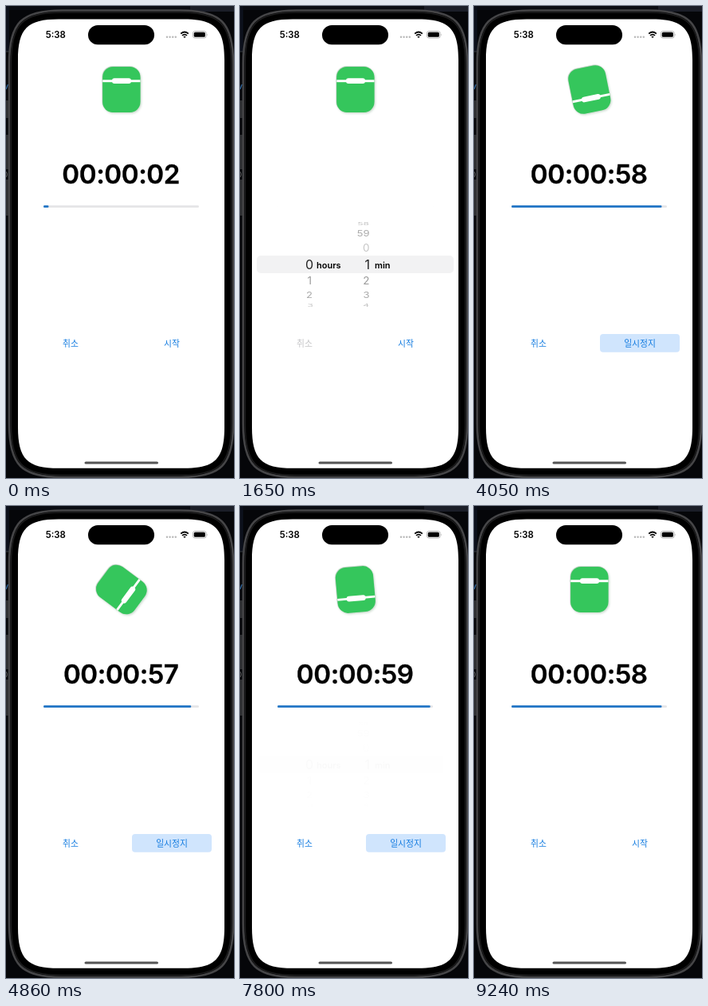
Write an HTML page that moves like this. It is 286x590 px and loops after 9.36 s.

```html
<!DOCTYPE html>
<html lang="ko">
<head>
<meta charset="utf-8">
<title>Timer</title>
<style>
  html, body { margin: 0; height: 100%; overflow: hidden; background: #000; }
  svg { display: block; width: 100%; height: 100%; }
  text { font-family: Inter, Roboto, sans-serif; }
  .ko { font-family: "Noto Sans CJK KR", "Noto Sans CJK", sans-serif; font-size: 10.8px; text-anchor: middle; fill: #147ce0; }
  .unit { font-size: 11px; font-weight: 600; }
  .row { text-anchor: end; }
  #clock { font-size: 33.2px; font-weight: 600; letter-spacing: -.45px; text-anchor: middle; stroke: #000; stroke-width: .3px; }
</style>
</head>
<body>
<svg viewBox="0 0 286 590">
  <defs>
    <filter id="relief" x="-30%" y="-30%" width="160%" height="160%">
      <feDropShadow dx="-.5" dy="-.6" stdDeviation=".3" flood-color="#4a7d58" flood-opacity=".5"/>
      <feDropShadow dx="1.2" dy="1.4" stdDeviation=".9" flood-color="#2a6a3c" flood-opacity=".25"/>
    </filter>
  </defs>

  <!-- desktop behind the phone -->
  <rect width="286" height="590" fill="#050609"/>
  <rect width="286" height="5" fill="#0a0c13"/>
  <rect x="231" width="55" height="7" fill="#1b1e28"/>
  <rect width="4" height="57" fill="#0c101b"/>
  <rect y="56.500" width="4" height="1" fill="#33363d"/>
  <path d="M0 104L2.500 98" stroke="#2f6fb0" stroke-width="1.200"/>
  <text x="-3.500" y="213.500" font-size="9" fill="#777">0</text>
  <g fill="#2d2e31">
    <rect x="-2" y="118" width="6" height="22" rx="1"/>
    <rect x="-2" y="161" width="6" height="43" rx="1"/>
    <rect x="-2" y="217" width="6" height="45" rx="1"/>
  </g>

  <!-- phone -->
  <path id="edge" stroke="#454547" stroke-width="2.600"/>
  <path id="bezel" fill="none" stroke="#1d1d1e" stroke-width="1.400"/>
  <path id="screen" fill="#fff"/>
  <rect x="103" y="24" width="83" height="24.300" rx="12.150"/>
  <rect x="98.500" y="569.400" width="92.500" height="3.200" rx="1.600" fill="#555"/>

  <!-- status bar -->
  <text x="62.300" y="40" font-size="11.400" font-weight="600" text-anchor="middle">5:38</text>
  <g fill="#b8b8b8">
    <circle cx="202" cy="38.700" r="1.200"/><circle cx="205.600" cy="38.700" r="1.200"/>
    <circle cx="209.200" cy="38.700" r="1.200"/><circle cx="212.800" cy="38.700" r="1.200"/>
  </g>
  <g fill="none" stroke="#000" stroke-width="1.700">
    <path d="M219.200 34.700Q224 30.300 228.800 34.700"/>
    <path d="M221 36.900Q224 34.200 227 36.900"/>
  </g>
  <path d="M222.300 38.300Q224 37 225.700 38.300L224 40Z"/>
  <rect x="234.300" y="31.500" width="17" height="8.600" rx="2.800" fill="none" stroke="#a6a6a6" stroke-width=".8"/>
  <rect x="235.700" y="32.800" width="14.200" height="6" rx="1.600"/>
  <path d="M252.300 34.400Q253.600 35.800 252.300 37.200Z" fill="#a6a6a6"/>

  <g filter="url(#relief)">
    <g id="icon">
      <rect x="121.200" y="76" width="47.300" height="57" rx="13" fill="#35c65b"/>
      <rect x="121.200" y="92.300" width="47.300" height="2.900" fill="#fff"/>
      <rect x="133" y="90.200" width="24" height="6.800" rx="3" fill="#fff"/>
    </g>
  </g>

  <g id="picker">
    <rect x="21" y="312" width="247" height="22" rx="5" fill="#f2f2f3"/>
    <g id="rows"></g>
    <text class="unit" x="96" y="327.600">hours</text>
    <text class="unit" x="169" y="327.600">min</text>
  </g>

  <g id="running">
    <text id="clock" x="144.200" y="221.600"></text>
    <rect x="47" y="249.300" width="195" height="2.700" rx="1.350" fill="#e5e5e7"/>
    <rect id="bar" x="47" y="249.300" height="2.700" rx="1.350" fill="#2075c6"/>
  </g>

  <rect id="pill" x="158" y="410" width="100" height="22.700" rx="4" fill="#d0e5fd"/>
  <text id="cancel" class="ko" x="81" y="425.700">취소</text>
  <text id="toggle" class="ko" x="208" y="425.700"></text>
</svg>

<script>
const LOOP = 9360, HALF = 450, BAR = 195, TOTAL = 60;
const $ = id => document.getElementById(id);

// [time, value] lists, ordered by time
const seconds = [[0, 2], [590, 1], [740, 0], [2781, 59], [3681, 58], [4581, 57], [7405, 59], [8305, 58]];
const picker = [[-HALF, 0], [740, 1], [2781, 0], [5890, 1], [7395, 0]];
const counting = [[0, 0], [570, 1], [740, 0], [2760, 1], [5400, 0], [7350, 1], [9120, 0]];
const cancellable = [[0, 1], [740, 0], [2760, 1], [5865, 0], [7350, 1]];

// wheel rows: right edge, centre y, text, size, vertical squash, colour
const rows = [
  [92, 323, "0", 16, 1, "#222"], [90, 343.500, "1", 13.500, .95, "#9a9a9a"],
  [91, 361, "2", 13, .78, "#a8a8a8"], [92, 373.800, "3", 12, .42, "#c4c4c4"],
  [163, 323, "1", 16, 1, "#222"], [162.500, 302.500, "0", 13.500, .95, "#c6c6c6"],
  [162.500, 284.500, "59", 13, .78, "#a8a8a8"], [162, 271.800, "58", 12, .42, "#c0c0c0"],
  [162.500, 343.500, "2", 13.500, .95, "#9a9a9a"], [162.500, 361, "3", 13, .78, "#a8a8a8"],
  [162, 373.800, "4", 12, .42, "#c0c0c0"]
];
$("rows").innerHTML = rows.map(([x, y, label, size, squash, fill]) =>
  `<text class="row" transform="translate(${x} ${y}) scale(1 ${squash})" y="${size * .36}" font-size="${size}" fill="${fill}">${label}</text>`
).join("");

// rectangle with smooth, continuous corners
function squircle(id, x, y, w, h, r) {
  const a = 1.4 * r, k = a - .32 * r;
  $(id).setAttribute("d", `M${x + a} ${y}h${w - 2 * a}c${k} 0 ${a} ${a - k} ${a} ${a}`
    + `v${h - 2 * a}c0 ${k} ${k - a} ${a} ${-a} ${a}h${2 * a - w}c${-k} 0 ${-a} ${k - a} ${-a} ${-a}`
    + `v${2 * a - h}c0 ${-k} ${a - k} ${-a} ${a} ${-a}z`);
}
squircle("edge", 4, 5.5, 281, 583.5, 47.5);
squircle("bezel", 6.5, 8, 276, 578.5, 45);
squircle("screen", 15, 16.5, 259, 561.3, 36.5);

const clamp = v => Math.min(1, Math.max(0, v));

// cubic-bezier(.42, 0, .58, 1)
function ease(v) {
  const x = clamp(v);
  let lo = 0, hi = 1;
  for (let i = 0; i < 20; i++) {
    const s = (lo + hi) / 2, r = 1 - s;
    if (1.26 * r * r * s + 1.74 * r * s * s + s * s * s < x) lo = s; else hi = s;
  }
  return lo * lo * (3 - 2 * lo);
}

const indexAt = (list, t) => list.reduce((found, [at], i) => at <= t ? i : found, 0);
const valueAt = (list, t) => list[indexAt(list, t)][1];

function glide(list, t, span) {
  const i = indexAt(list, t), [at, value] = list[i];
  const from = i ? list[i - 1][1] : value;
  return from + (value - from) * ease((t - at) / span);
}

// two eased half turns, the first one starting at angle `from`
const spin = (u, from = 0) =>
  from + (180 - from) * ease(u / HALF) + 180 * ease((u - HALF) / HALF);

function angle(t) {
  const i = indexAt(seconds, t);
  if (!i) return 0;
  const at = seconds[i][0], gap = at - seconds[i - 1][0];
  return spin(t - at, i > 1 && gap < HALF ? spin(gap) : 0);
}

function draw(t) {
  const shown = glide(picker, t, HALF), on = valueAt(counting, t);
  $("picker").setAttribute("opacity", shown);
  $("running").setAttribute("opacity", 1 - shown);
  $("clock").textContent = "00:00:" + String(valueAt(seconds, t)).padStart(2, "0");
  $("bar").setAttribute("width", BAR * glide(seconds, t, 230) / TOTAL);
  $("icon").setAttribute("transform", `rotate(${angle(t)} 144.85 104.5)`);
  $("pill").setAttribute("opacity", on);
  $("toggle").textContent = on ? "일시정지" : "시작";
  $("cancel").style.fill = valueAt(cancellable, t) ? "" : "#c4c4c6";
}

const start = performance.now();
function tick() {
  draw((performance.now() - start) % LOOP);
  requestAnimationFrame(tick);
}
draw(0);
requestAnimationFrame(tick);
</script>
</body>
</html>
```
